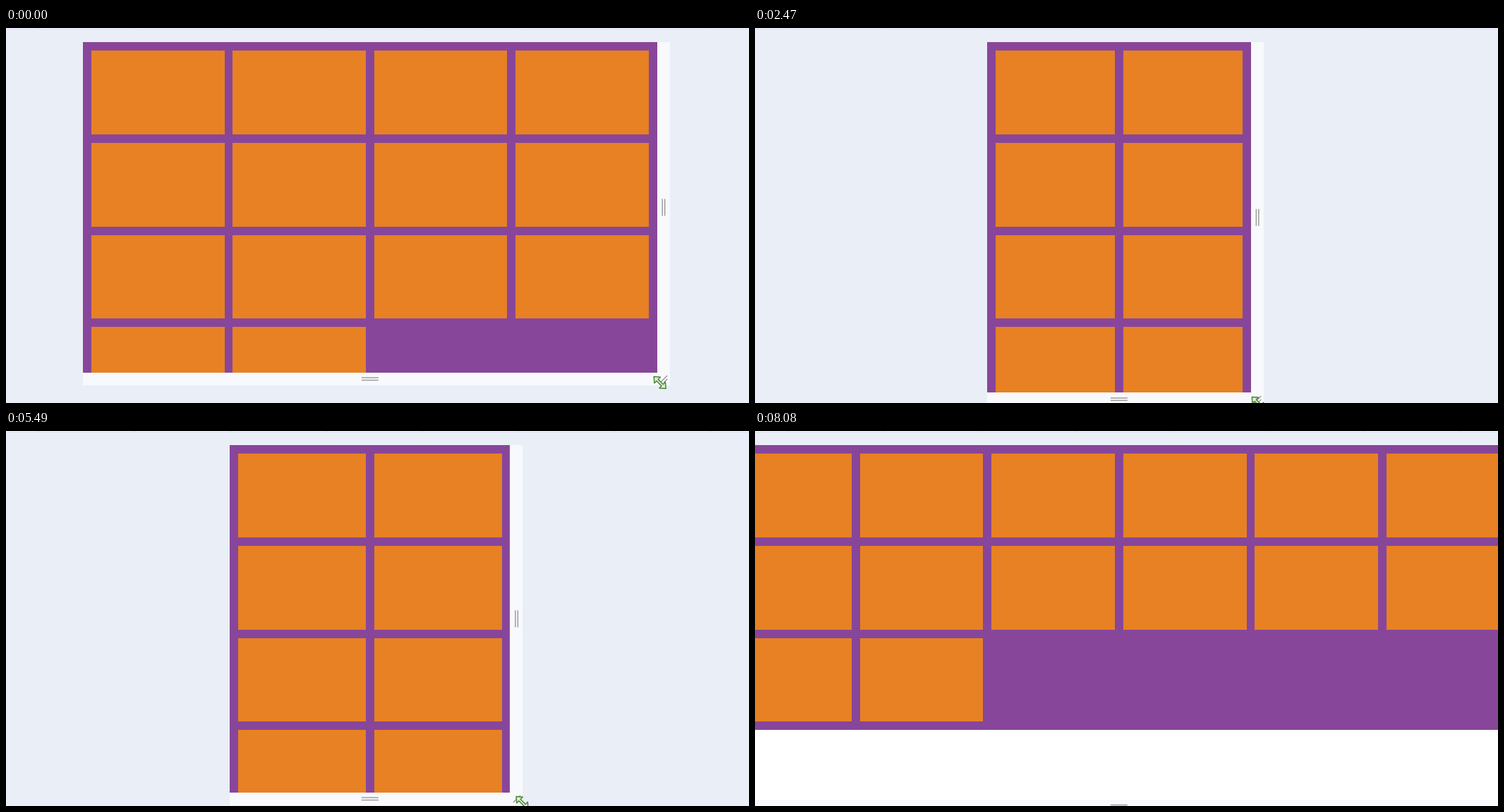
An HTML page with a canvas that plays this animation: 1053x532 px, repeating every 8.7 s.

```html
<!DOCTYPE html>
<html lang="en">
<head>
<meta charset="utf-8">
<title>Responsive grid</title>
<style>
  html, body { margin: 0; width: 100%; height: 100%; overflow: hidden; background: #eaeef6; }
  canvas { display: block; width: 1053px; height: 532px; }
</style>
</head>
<body>
<canvas id="stage" width="1053" height="532"></canvas>
<script>
const W = 1053, H = 532, LOOP = 8700;
const ctx = document.getElementById('stage').getContext('2d');

// Page layout: auto-fill grid, cards at least 250px wide, shown at a reduced scale
const SCALE = 0.594, GAP = 20 * SCALE, MIN = 250 * SCALE, CARD_H = 200 * SCALE;
const CARDS = 14, CX = 515.9, TOP = 20.3, BAR = 18;

// The viewport repaints in steps while it is dragged
const STEP = 81.6, FIRST = 20;

// Drag path: time and size at the points where the hand changes pace
const widths = [
  [0, 813.6], [1490, 549.4], [2470, 373.6], [3030, 350], [3530, 303.8],
  [4150, 348], [5200, 338], [5490, 398], [6305, 746], [8020, 1131.8]
];
const bottoms = [[0, 488.6], [1490, 493.6], [2470, 517.4], [5490, 512.6], [6305, 519.5], [8020, 523]];

// Smooth curve through the points, at rest at both ends
function curve(points, t) {
  const last = points.length - 1;
  if (t >= points[last][0]) return points[last][1];
  const i = points.findIndex(p => p[0] > t) - 1;
  const slope = k => {
    const a = points[Math.max(k - 1, 0)], b = points[Math.min(k + 1, last)];
    return k === last ? 0 : (b[1] - a[1]) / (b[0] - a[0]);
  };
  const [t0, v0] = points[i], [t1, v1] = points[i + 1];
  const d = t1 - t0, u = (t - t0) / d, r = 1 - u;
  return v0 * r * r * (1 + 2 * u) + v1 * u * u * (1 + 2 * r)
    + d * u * r * (slope(i) * r - slope(i + 1) * u);
}

function rect(x, y, w, h, fill) {
  const [l, t, r, b] = [x, y, x + w, y + h].map(Math.round);
  ctx.fillStyle = fill;
  ctx.fillRect(l, t, r - l, b - t);
}

function line(x1, y1, x2, y2) {
  ctx.beginPath();
  ctx.moveTo(x1, y1);
  ctx.lineTo(x2, y2);
  ctx.stroke();
}

function drawBackdrop() {
  rect(0, 0, W, H, '#eaeef6');
  rect(0, 0, W, 1, '#f1f4fb');
  rect(0, 1, W, 1, '#dce1f1');
  for (let x = 46; x < W; x += 136) rect(x, 0, 1, 1, '#cfd6ea');
}

function drawBars(left, right, bottom) {
  rect(left, TOP, right + BAR - left, bottom + BAR - TOP, '#f8f9fc');
  ctx.strokeStyle = '#989898';
  ctx.lineWidth = 1.4;
  const mid = (TOP + bottom) / 2;
  for (const d of [7.5, 11]) {
    line(right + d, mid - 12, right + d, mid + 12);
    line(CX - 12, bottom + d, CX + 12, bottom + d);
  }
  for (const d of [4.5, 9.5])
    line(right + d, bottom + 14.5, right + 14.5, bottom + d);
}

function drawPage(left, width, bottom) {
  const cols = Math.floor((width - GAP) / (MIN + GAP));
  const cardW = (width - GAP) / cols - GAP, rowH = CARD_H + GAP;
  const rows = Math.ceil(CARDS / cols);
  ctx.save();
  ctx.beginPath();
  ctx.rect(0, 0, W, Math.round(bottom));
  ctx.clip();
  rect(left, TOP, width, H, '#fff');
  rect(left, TOP, width, rows * rowH + GAP, '#88469a');
  for (let i = 0; i < CARDS; i++) {
    const x = left + GAP + (i % cols) * (cardW + GAP);
    const y = TOP + GAP + Math.floor(i / cols) * rowH;
    rect(x, y, cardW, CARD_H, '#e78123');
  }
  ctx.restore();
}

const arrow = new Path2D('M-12 0L-5-6V-1.6H5V-6L12 0L5 6V1.6H-5V6Z');

function drawPointer(x, y) {
  ctx.save();
  ctx.translate(x, y);
  ctx.rotate(Math.PI / 4);
  ctx.lineJoin = 'round';
  ctx.fillStyle = '#dcefcf';
  ctx.strokeStyle = '#48853a';
  ctx.lineWidth = 1.5;
  ctx.fill(arrow);
  ctx.stroke(arrow);
  ctx.restore();
}

function draw(time) {
  const t = Math.max(0, FIRST + Math.floor((time - FIRST) / STEP) * STEP);
  const width = curve(widths, t), bottom = curve(bottoms, t);
  const left = CX - width / 2, right = CX + width / 2;
  drawBackdrop();
  drawBars(left, right, bottom);
  drawPage(left, width, bottom);
  // the pointer slowly drifts off the corner
  drawPointer(right + 4 + t * 0.0024, bottom + 14.5);
}

const start = performance.now();
function tick() {
  draw((performance.now() - start) % LOOP);
  requestAnimationFrame(tick);
}
tick();
</script>
</body>
</html>
```
